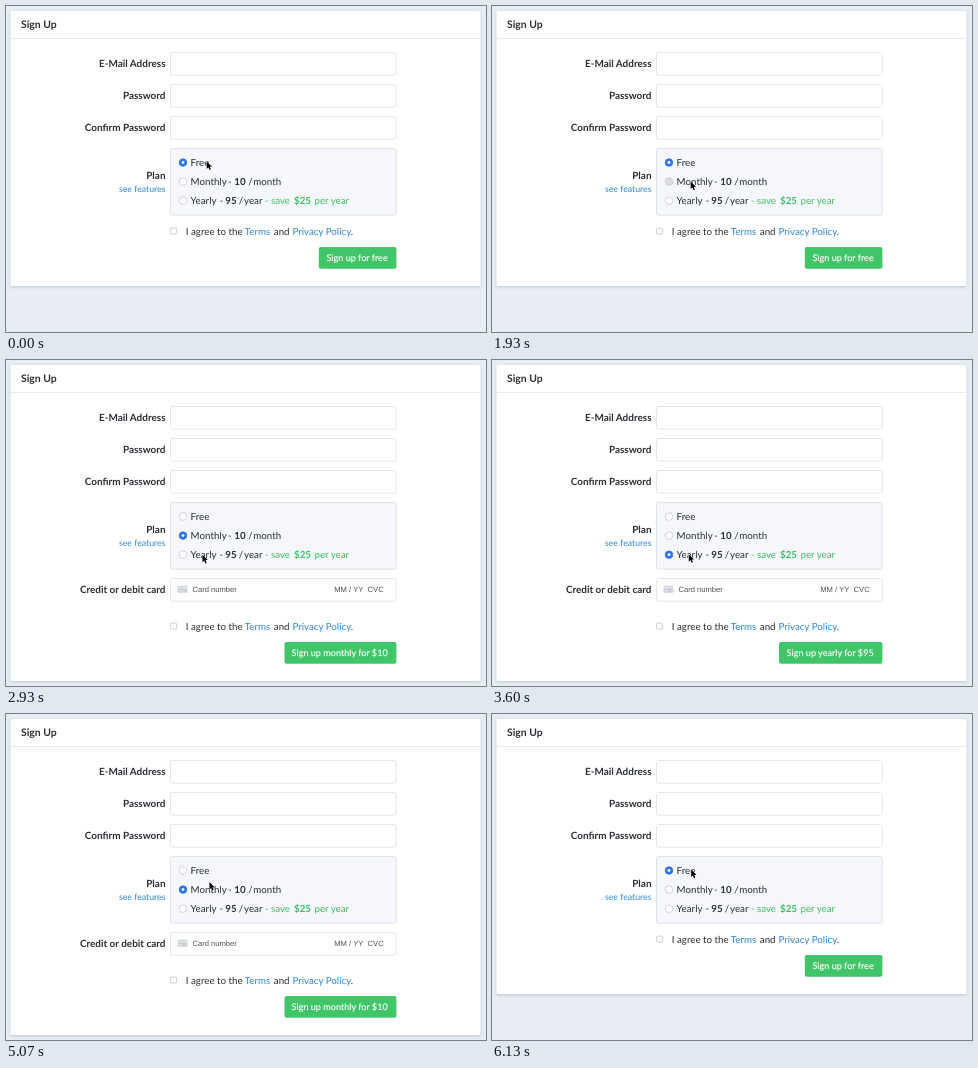
An HTML page for the animation above (6470 ms loop, 480 by 326 pixels).

```html
<!DOCTYPE html>
<html lang="en">
<head>
<meta charset="utf-8">
<title>Sign Up</title>
<style>
  html, body { margin: 0; width: 100%; height: 100%; overflow: hidden; background: #e8edf4; }
  svg { display: block; width: 100%; height: 100%; }
  text { font: 9.75px Lato, sans-serif; fill: #2a2f35; white-space: pre; text-rendering: geometricPrecision; }
  .b { font-weight: 700; }
  .label { font-size: 9.95px; font-weight: 700; text-anchor: end; }
  .link { fill: #2f87d8; }
  .save { fill: #3cc263; }
  .small { font-size: 8.75px; text-anchor: end; }
  .hint { font: 7.6px "Liberation Sans", Arial, sans-serif; fill: #4d5257; }
  .btn { font-size: 9.1px; fill: #fff; stroke: #fff; stroke-width: .15; text-anchor: end; }
  .field { fill: #fff; stroke: #e3e5e8; }
  .panel { filter: drop-shadow(0 1px 1.5px rgba(40, 60, 90, .22)); }
</style>
</head>
<body>
<svg viewBox="0 0 480 326">
  <rect width="480" height="326" fill="#e8edf4"/>
  <rect id="panel" class="panel" x="4.5" y="5" width="470" height="275" rx="1.5" fill="#fff"/>
  <path d="M4.5 32.5H474.5" stroke="#e8ebee"/>
  <text x="15" y="22.4" class="b" style="font-size:10.4px">Sign Up</text>

  <g id="fields"></g>

  <text x="159.5" y="172.8" class="label">Plan</text>
  <text x="159.5" y="186" class="link small">see features</text>
  <rect x="164.5" y="142.5" width="225.7" height="66.7" rx="2" fill="#f5f7fc" stroke="#dfe2e9"/>
  <g id="radios"></g>
  <text x="184.6" y="160">Free</text>
  <text y="179"><tspan x="184.6">Monthly</tspan><tspan x="222">-</tspan><tspan x="228.3" class="b">10</tspan><tspan x="242.3">/</tspan><tspan x="247.3">month</tspan></text>
  <text y="198.2"><tspan x="184.6">Yearly</tspan><tspan x="213.5">-</tspan><tspan x="219.3" class="b">95</tspan><tspan x="232.8">/</tspan><tspan x="238">year</tspan><tspan class="save"><tspan x="259">-</tspan><tspan x="265">save</tspan><tspan x="288" class="b">$25</tspan><tspan x="308.5">per year</tspan></tspan></text>

  <g id="card">
    <text x="159.5" y="232.7" class="label">Credit or debit card</text>
    <rect x="164.5" y="218.5" width="225.7" height="22.7" rx="2" class="field"/>
    <rect x="171.5" y="225.8" width="10" height="7" rx="1" fill="#cdd3da"/>
    <path d="M171.5 227.7H181.5M173 230.8H176" stroke="#eff2f5" stroke-width=".9"/>
    <text x="186.5" y="231.6" class="hint">Card number</text>
    <text x="328.3" y="231.6" class="hint">MM / YY</text>
    <text x="361.6" y="231.6" class="hint">CVC</text>
  </g>

  <g id="foot">
    <rect x="164.6" y="222.1" width="6" height="6" rx="1" fill="#fff" stroke="#c2c5c9" stroke-width=".8"/>
    <text y="228.7"><tspan x="179.8">I agree to the</tspan><tspan x="238.7" class="link">Terms</tspan><tspan x="267.8">and</tspan><tspan x="286.4" class="link">Privacy Policy</tspan><tspan>.</tspan></text>
    <rect id="btn" y="241" height="21.7" rx="2" fill="#40c668"/>
    <text id="btnText" x="381.7" y="255.3" class="btn"></text>
  </g>

  <path id="cursor" d="M0 0V7.5L1.7 5.9L2.9 8.7L4.2 8.1L3 5.4H5.3Z" fill="#000" stroke="#fff" stroke-width=".7" stroke-linejoin="round" paint-order="stroke"/>
</svg>
<script>
const LOOP = 6470, STEP = 200 / 3;
const $ = id => document.getElementById(id);

$('fields').innerHTML = ['E-Mail Address', 'Password', 'Confirm Password'].map((name, i) => {
  const y = 46.5 + 32 * i;
  return `<text x="159.5" y="${y + 14.8}" class="label">${name}</text>
    <rect x="164.5" y="${y}" width="225.7" height="22.7" rx="2" class="field"/>`;
}).join('');

$('radios').innerHTML = [156.5, 175.6, 194.7].map(y =>
  `<circle cx="177" cy="${y}" r="3.8" stroke-width=".7"/><circle cx="177" cy="${y}" r="1.4" fill="#fff"/>`
).join('');
const radios = [...$('radios').children];

const plans = [
  { text: 'Sign up for free', left: 312.8 },
  { text: 'Sign up monthly for $10', left: 278.5 },
  { text: 'Sign up yearly for $95', left: 287 }
];

// Mouse down and resulting selection times
const clicks = [
  { down: 1865, up: 1995, plan: 1 },
  { down: 3065, up: 3195, plan: 2 },
  { down: 4465, up: 4595, plan: 1 },
  { down: 5865, up: 6128, plan: 0 }
];

// start, end, target x, target y
const moves = [
  [200, 867, 193.6, 174],
  [867, 1000, 193.2, 174],
  [1533, 1733, 198.7, 175.6],
  [2267, 2933, 196.5, 194.7],
  [3533, 4200, 205.8, 174.8],
  [4867, 5333, 199.8, 157.5],
  [5467, 5667, 199.2, 155.6]
];

const ease = p => p * p * (3 - 2 * p);

function cursorAt(t) {
  let x = 200.7, y = 155.4;
  for (const [start, end, tx, ty] of moves) {
    const p = ease(Math.min(1, Math.max(0, (t - start) / (end - start))));
    x += (tx - x) * p;
    y += (ty - y) * p;
  }
  return [x, y];
}

function draw(t) {
  let plan = 0, pressed = -1;
  for (const c of clicks) {
    if (t >= c.up) plan = c.plan;
    else if (t >= c.down) pressed = c.plan;
  }
  const paid = plan > 0;
  for (let i = 0; i < 3; i++) {
    const ring = radios[2 * i], on = i === plan;
    ring.setAttribute('fill', on ? '#2f74ea' : i === pressed ? '#dcdde1' : '#fff');
    ring.setAttribute('stroke', on ? '#2f6fe0' : '#c2c5cb');
    radios[2 * i + 1].setAttribute('visibility', on ? 'visible' : 'hidden');
  }
  $('panel').setAttribute('height', paid ? 316 : 275);
  $('card').setAttribute('visibility', paid ? 'visible' : 'hidden');
  $('foot').setAttribute('transform', `translate(0 ${paid ? 41 : 0})`);
  $('btn').setAttribute('x', plans[plan].left);
  $('btn').setAttribute('width', 390.4 - plans[plan].left);
  $('btnText').textContent = plans[plan].text;

  // The pointer advances at 15 steps per second
  const [x, y] = cursorAt(Math.floor((t + 5) / STEP) * STEP);
  $('cursor').setAttribute('transform', `translate(${x.toFixed(2)} ${y.toFixed(2)})`);
}

const begin = performance.now();
function tick() {
  draw((performance.now() - begin) % LOOP);
  requestAnimationFrame(tick);
}
tick();
</script>
</body>
</html>
```
